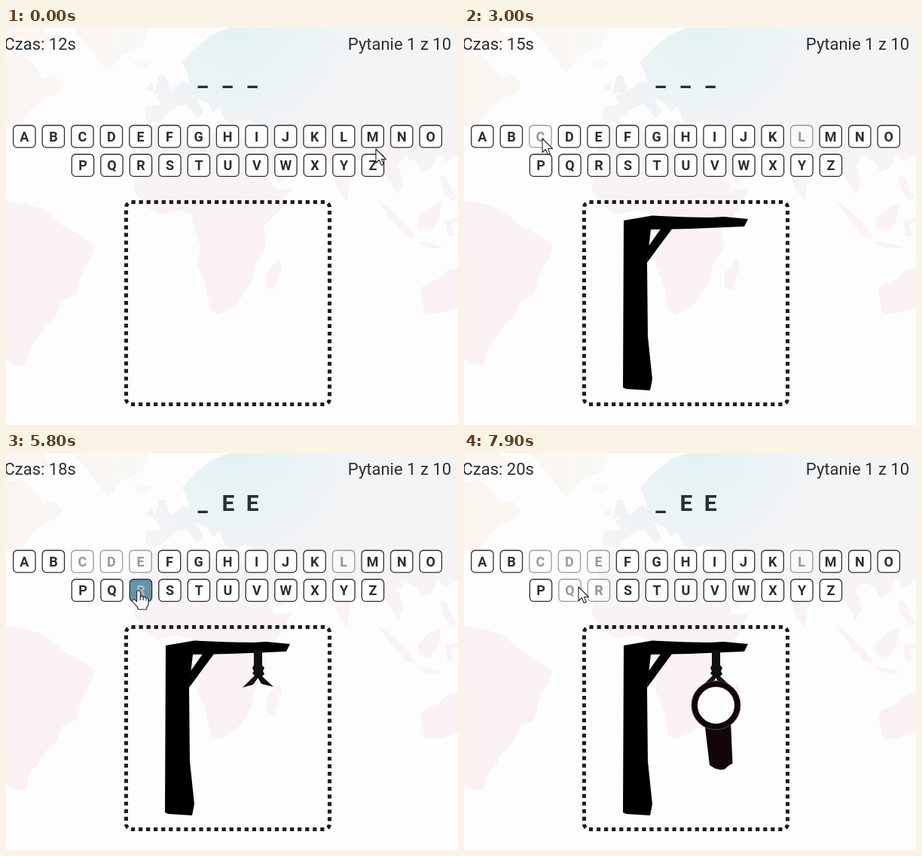
An HTML page that plays this animation: 600x528 px, repeating every 8000 ms.

```html
<!DOCTYPE html>
<html lang="pl">
<head>
<meta charset="utf-8">
<title>Wisielec</title>
<style>
html, body { margin: 0; width: 100%; height: 100%; overflow: hidden; background: #fefdfe; }
svg { display: block; width: 600px; height: 528px; }
text { font-family: Roboto, Arial, sans-serif; fill: #2b2e32; }
.info { font-size: 22px; }
.word { font-size: 30px; font-weight: 700; }
.key { font-size: 18px; font-weight: 700; text-anchor: middle; }
</style>
</head>
<body>
<svg viewBox="0 0 600 528">
  <defs>
    <linearGradient id="land" gradientUnits="userSpaceOnUse" x1="0" y1="0" x2="0" y2="450">
      <stop offset="0" stop-color="#f3f4f6"/>
      <stop offset=".35" stop-color="#f7f3f6"/>
      <stop offset=".6" stop-color="#faf2f4"/>
      <stop offset="1" stop-color="#f9f1f2"/>
    </linearGradient>
    <radialGradient id="cool" gradientUnits="userSpaceOnUse" cx="310" cy="0" r="190">
      <stop offset="0" stop-color="#e3f2f4"/>
      <stop offset=".5" stop-color="#e9f3f5" stop-opacity=".75"/>
      <stop offset="1" stop-color="#f0f4f6" stop-opacity="0"/>
    </radialGradient>
    <linearGradient id="warm" gradientUnits="userSpaceOnUse" x1="0" y1="0" x2="200" y2="0">
      <stop offset="0" stop-color="#fbf5f0"/>
      <stop offset="1" stop-color="#f9f8f6"/>
    </linearGradient>
  </defs>

  <path fill="url(#warm)" d="M0 38L22 36 36 48 50 68 62 62 76 74 70 86 47 96 32 110 22 126 6 132 0 130ZM0 0H48L60 16 40 30 18 22 0 28ZM88 0H190L182 24 152 38 136 60 122 42 106 20ZM168 45L182 41 194 46 184 53 172 52Z"/>
  <g id="world">
    <path d="M240 60L234 46 250 28 272 10 290 2 300 0H600V170L584 178 572 168 566 186 552 192 545 178 530 172 520 182 528 206 520 222 510 204 500 192 490 172 474 168 460 186 452 232 440 214 430 184 414 166 394 160 376 158 392 172 388 190 362 206 348 190 336 162 326 144 336 128 318 122 300 128 290 122 284 104 274 112 268 100 252 92 262 112 254 120 240 102 228 104 214 114 202 126 184 122 186 104 206 102 200 90 220 82 236 70 244 74ZM196 88L204 62 212 64 218 84ZM184 82L194 72 196 84Z"/>
    <path d="M188 130L230 126 240 140 264 138 294 144 328 148 340 180 356 214 378 214 364 242 342 264 345 292 330 316 326 338 306 368 282 381 272 376 264 338 254 316 258 290 250 268 246 248 228 242 202 248 184 236 170 216 172 186 180 154ZM362 306L366 318 356 348 346 346 346 326Z"/>
    <path d="M0 230L26 234 52 242 74 262 100 276 118 290 112 306 100 328 94 354 74 364 66 384 52 398 42 414 32 424 26 448 12 448 0 440Z"/>
    <path d="M494 230L504 236 532 262 544 280 532 278 514 258ZM546 254L564 238 578 232 574 256 562 272 548 268ZM540 284L562 286 582 292 562 293ZM584 256L600 252V258L590 262 596 276 586 276ZM576 198L584 196 592 216 600 226 590 230 580 214Z"/>
    <path d="M600 318L586 322 574 334 554 342 550 352 556 380 572 380 600 372Z"/>
  </g>

  <text id="timer" class="info" x="-2.5" y="29"></text>
  <text class="info" x="591" y="29" text-anchor="end">Pytanie 1 z 10</text>
  <g id="word"></g>
  <g id="keys"></g>
  <rect x="159.5" y="231.5" width="270" height="269" rx="7" fill="none" stroke="#1b1d22"
        stroke-width="5" pathLength="1060" stroke-dasharray="5.2 4.8"/>

  <path id="post" d="M212 256L250 249.500 295 251.500 328 252 345 251 377 254 372 264 300 267 248 268 243 312 244 410 250 467 247 482 215 480 211 478Z"/>
  <path id="brace" d="M262 266H277L243 312 245 290Z"/>
  <path id="rope" fill="#111" d="M329 262H340V282L343 286 341 290 343 294 340 297 355 311 339 307 334.500 299 328 308 314 312 330 296 327 293 329 290 327 286 329 282Z"/>
  <path id="body" fill="#120606" d="M319 356H354L356.500 413Q350 416 347 420Q338 424 326 415Z"/>
  <g id="head">
    <circle cx="334.500" cy="335.500" r="28.500" fill="#fefdfe" stroke="#110507" stroke-width="8"/>
    <circle cx="334.500" cy="335.500" r="32.500" fill="none" stroke="#555" stroke-width=".8"/>
  </g>

  <g id="pointer" stroke="#222" stroke-width="1.1" stroke-linejoin="round" fill="#fff">
    <path id="arrow" d="M0 0V18.500L4.300 14.500 7.300 21.500 10.300 20.200 7.400 13.500H13.500Z"/>
    <g id="hand">
      <path d="M-2.300 1.500Q0 -2 2.300 1.500V8Q4.800 6.300 6.200 8.800Q8.800 7.300 10 10Q12.800 9 13 12.500V17Q13 20 10.800 22V25H-1V22.500Q-5 18.500 -8 14.500Q-8.800 11.300 -5.500 11.800L-2.300 14.500Z"/>
      <path fill="none" d="M2.300 8V13M6.200 9V13M10 10.500V13.500"/>
    </g>
  </g>
</svg>
<script>
const LOOP = 8000, STEP = 100, FADE = 150;
const INK = [43, 46, 50], TEAL = [20, 96, 128], WHITE = [255, 255, 255];
const $ = id => document.getElementById(id);

function add(parent, tag, attrs, label = '') {
  const el = document.createElementNS('http://www.w3.org/2000/svg', tag);
  for (const k in attrs) el.setAttribute(k, attrs[k]);
  el.textContent = label;
  parent.append(el);
  return el;
}

// land tint: base layer plus a cool overlay
const cool = $('world').cloneNode(true);
cool.removeAttribute('id');
$('world').setAttribute('fill', 'url(#land)');
cool.setAttribute('fill', 'url(#cool)');
$('world').after(cool);

// moment each guessed letter is clicked
const clicks = { L: 800, C: 2500, D: 4200, E: 4900, R: 6000, Q: 7400 };
const parts = { post: 'L', brace: 'C', rope: 'D', head: 'R', body: 'Q' };

// pointer stops: time, x, y
const route = [
  [0, 491, 161], [600, 446, 141], [1500, 446, 141], [1700, 386, 176],
  [1900, 258, 174], [2000, 205, 163], [2100, 166, 148], [2300, 104, 147],
  [3500, 104, 147], [3900, 151, 147], [4400, 151, 147], [4700, 178, 147],
  [5500, 178, 147], [5700, 176, 183], [6700, 176, 183], [7000, 159, 185],
  [7100, 133, 183], [7600, 133, 183], [7800, 152, 178]
];

const keys = [...'ABCDEFGHIJKLMNOPQRSTUVWXYZ'].map((name, i) => {
  const low = i > 14;
  const x = low ? 87.3 + (i - 15) * 38.5 : 9.7 + i * 38.53;
  const y = low ? 168 : 129.5;
  const g = add($('keys'), 'g', {});
  const box = add(g, 'rect', { x, y, width: 29.3, height: 29.3, rx: 5, stroke: '#2b2e32', 'stroke-width': 1.3 });
  const label = add(g, 'text', { class: 'key', x: x + 14.65, y: y + 21.3 }, name);
  return { x, y, g, box, label, off: clicks[name] || Infinity };
});

const slots = [[254.5, 254.5], [287.5, 286.5], [320.5, 318.8]].map(x =>
  ({ x, el: add($('word'), 'text', { class: 'word', y: 76.7 }) }));

const clamp = v => Math.max(0, Math.min(1, v));
const mix = (a, b, k) => `rgb(${a.map((v, i) => Math.round(v + (b[i] - v) * k))})`;
const show = (el, on) => el.setAttribute('visibility', on ? 'visible' : 'hidden');

function place(t) {
  const i = route.findIndex(p => p[0] > t);
  if (i < 0) return route[route.length - 1].slice(1);
  if (i === 0) return route[0].slice(1);
  const [a, b] = [route[i - 1], route[i]];
  const k = (t - a[0]) / (b[0] - a[0]);
  return [a[1] + (b[1] - a[1]) * k, a[2] + (b[2] - a[2]) * k];
}

function over(key, t) {
  const [x, y] = place(t);
  return t < key.off && x >= key.x && x <= key.x + 30 && y >= key.y && y <= key.y + 30;
}

function glow(key, t) {
  let v = 0;
  for (let s = t - 5 * STEP; s < t; s += STEP)
    v = clamp(v + (over(key, s) ? STEP : -STEP) / FADE);
  return v;
}

function draw(t) {
  $('timer').textContent = `Czas: ${12 + Math.floor((t + 900) / 1000)}s`;

  const found = t > clicks.E;
  slots.forEach((s, i) => {
    s.el.textContent = found && i ? 'E' : '_';
    s.el.setAttribute('x', s.x[found ? 1 : 0]);
  });

  for (const key of keys) {
    const v = glow(key, t);
    key.box.setAttribute('fill', mix(WHITE, TEAL, v));
    key.label.style.fill = mix(INK, WHITE, v);
    key.g.setAttribute('opacity', 1 - 0.52 * clamp((t - key.off) / FADE));
  }

  for (const id in parts) show($(id), t > clicks[parts[id]]);

  const hot = keys.some(key => over(key, t));
  show($('hand'), hot);
  show($('arrow'), !hot);
  $('pointer').setAttribute('transform', `translate(${place(t)})`);
}

const start = performance.now();
function tick() {
  const t = (performance.now() - start) % LOOP;
  draw(Math.floor(t / STEP) * STEP);
  requestAnimationFrame(tick);
}
tick();
</script>
</body>
</html>
```
